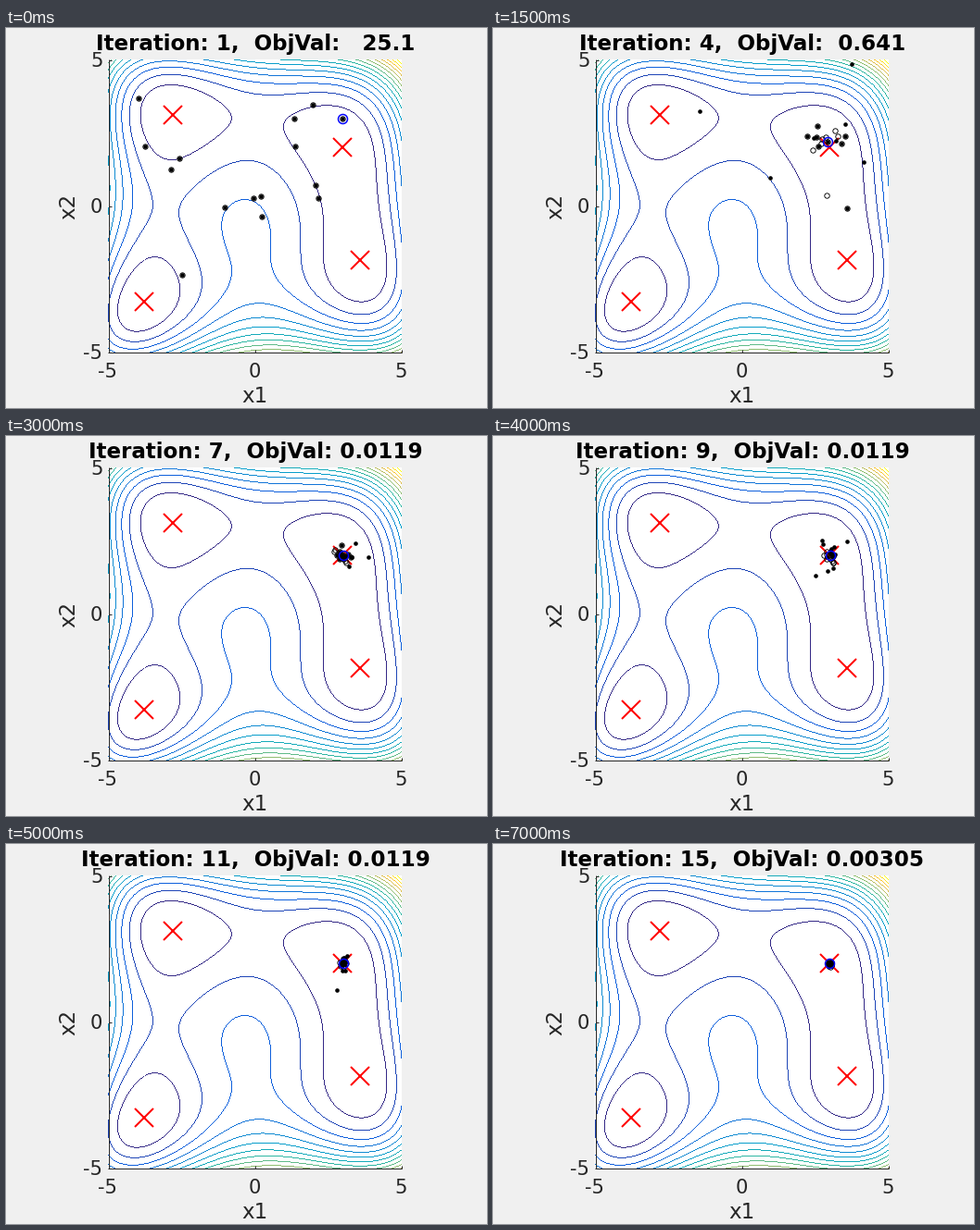
Recreate the animation shown at these times as a matplotlib script. Size 519 by 411 pixels, loop 7.5 s.

```python
import numpy as np
import matplotlib.pyplot as plt
from matplotlib.animation import FuncAnimation
from matplotlib.colors import LinearSegmentedColormap

W, H = 519, 411
STEPS = 15
LEVELS = 15
CX, CY, UNIT = 268.5, 192.5, 31.6
HALF = 158                      # half the plot side in pixels
INK = "#262626"

PARULA = LinearSegmentedColormap.from_list(
    "parula", ["#352a87", "#0f5cdd", "#1481d6", "#06a4ca", "#2eb7a4",
               "#87bf77", "#d1bb59", "#fec832", "#f9fb0e"])
MINIMA = [(3, 2), (-2.805, 3.131), (-3.779, -3.283), (3.584, -1.848)]

# First step, best value and its place
BESTS = [(0, 25.1, (3, 2.98)), (1, 6.02, (3.02, 2.5)), (2, 2.27, (2.72, 2.09)),
         (3, 0.641, (2.93, 2.2)), (4, 0.136, (2.96, 2)),
         (6, 0.0119, (3.01, 2.02)), (11, 0.00305, (3, 2.01))]

START = np.array([
    (-3.97, 3.69), (-3.75, 2.04), (-2.86, 1.25), (-2.57, 1.63), (-1.03, -.05),
    (-2.5, -2.36), (-.06, .27), (.21, .33), (.25, -.36), (1.33, 2.99),
    (1.98, 3.47), (1.39, 2.04), (2.06, .71), (2.18, .27), (3, 2.98)])


def himmelblau(x, y):
    return (x**2 + y - 11)**2 + (x + y**2 - 7)**2


def px(x, y):
    return CX + UNIT * x, CY - UNIT * y


def best(step):
    return [b for b in BESTS if b[0] <= step][-1]


def fly():
    """Swarm and personal bests at each step, closing in on the leader."""
    rng = np.random.default_rng(12)
    own, path = START.copy(), [(START, START)]
    for k in range(1, STEPS):
        since, _, lead = best(k)
        scatter = rng.standard_t(3, START.shape) * 1.1 * np.exp(-k / 4.5)
        now = lead + (START - lead) * 0.3**k + scatter
        now = np.clip(now, -5, 5)
        if since == k:
            now[-1] = lead
        better = himmelblau(*now.T) < himmelblau(*own.T)
        own = np.where(better[:, None], now, own)
        path.append((now, own))
    return path


def contour_image():
    """One-pixel contour lines, evaluated at each pixel centre."""
    g = np.linspace(-5, 5, 2 * HALF + 1)
    z = himmelblau(*np.meshgrid(g, g[::-1]))
    slope = np.abs(np.gradient(z)).max(axis=0)
    gap = z.max() / (LEVELS + 1)
    n = np.clip(np.rint(z / gap), 1, LEVELS)
    img = PARULA((n - 1) / (LEVELS - 1))
    img[np.abs(z - n * gap) > slope / 2] = 1
    return img


fig = plt.figure(figsize=(W / 72, H / 72), dpi=72, facecolor="#f0f0f0")
ax = fig.add_axes([0, 0, 1, 1])
box = (CX - HALF - .5, CX + HALF + .5, CY + HALF + .5, CY - HALF - .5)
ax.imshow(contour_image(), extent=box, interpolation="nearest", aspect="auto")
ax.set(xlim=(0, W), ylim=(H, 0))
ax.axis("off")


def rule(xs, ys):
    ax.plot(xs, ys, color=INK, lw=1, solid_capstyle="butt")


def label(x, y, s, size=21.1, **kw):
    return ax.text(x, y, s, fontsize=size, family="DejaVu Sans",
                   **{"color": INK, "ha": "center", "va": "baseline", **kw})


left, bottom = px(-5, -5)
rule([left, left], box[2:])
rule(box[:2], [bottom, bottom])
for v in (-5, 0, 5):
    x, y = px(v, v)
    rule([x, x], [bottom, bottom - 3])
    rule([left, left + 3], [y, y])
    label(x - .5, 378, str(v))
    label(104.5, y + 7.5, str(v), ha="right")
label(CX, 405, "x1", 23)
label(74, CY, "x2", 23, rotation=90, rotation_mode="anchor")
title = label(269, 24, "", 22.95, color="black", weight="bold")

ax.plot(*px(*np.array(MINIMA).T), "x", color="red", ms=20, mew=2)
rings, = ax.plot([], [], "o", mfc="none", mec="black", ms=5.4, mew=0.9)
dots, = ax.plot([], [], "o", color="black", ms=4.6, mew=0)
top, = ax.plot([], [], "o", mfc="none", mec="blue", ms=10, mew=1.5)

path = fly()


def draw(step):
    now, own = path[step]
    _, value, spot = best(step)
    dots.set_data(*px(*now.T))
    rings.set_data(*px(*own.T))
    top.set_data(*px(*np.array([spot]).T))
    title.set_text(f"Iteration: {step + 1},  ObjVal: {value:6.3g}")
    return dots, rings, top, title


anim = FuncAnimation(fig, draw, frames=STEPS, interval=500, repeat=True)
plt.show()
```
